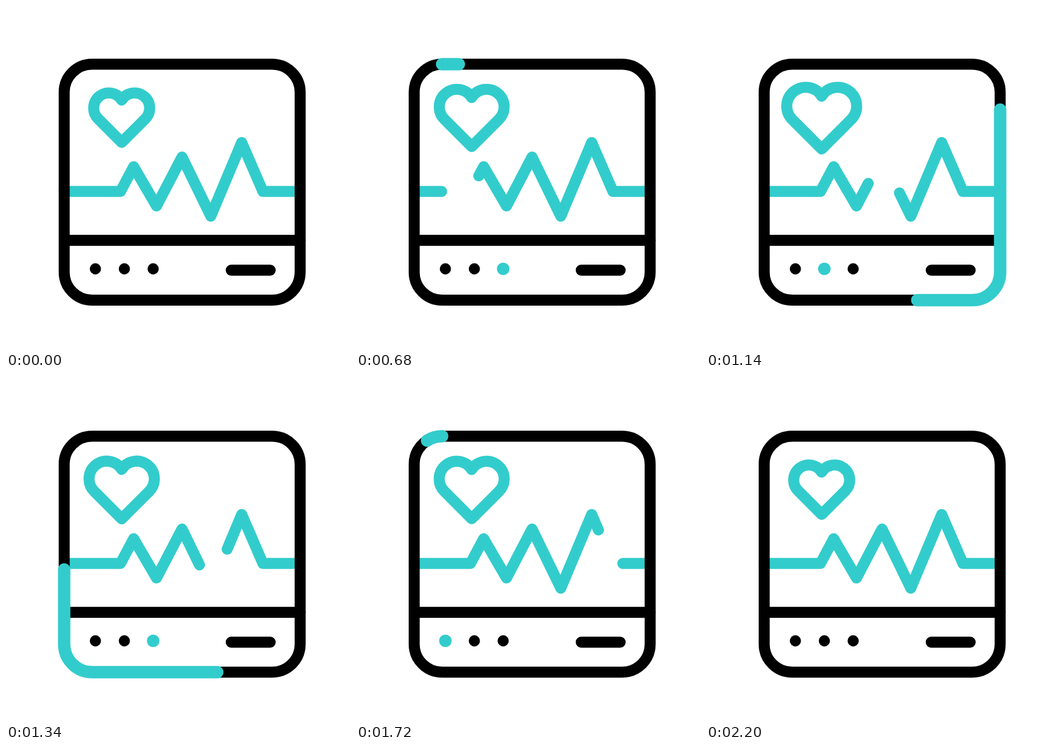
These frames come from a looping animation (640 by 640 pixels, 2400 ms). An HTML page:

```html
<!DOCTYPE html>
<html lang="en">
<head>
<meta charset="utf-8">
<title>Heart monitor</title>
<style>
  @property --tail { syntax: "<length>"; inherits: false; initial-value: 0px; }
  @property --head { syntax: "<length>"; inherits: false; initial-value: 0px; }
  @property --beat { syntax: "<number>"; inherits: false; initial-value: 1; }

  :root {
    --teal: #33cccc;
    --line: 20.5px;
    --loop: 2400ms cubic-bezier(.3333, 0, .6667, 1) infinite;
  }
  html, body { margin: 0; width: 100%; height: 100%; overflow: hidden; background: #fff; }
  svg { display: block; width: 640px; height: 640px; }

  .ink, .teal {
    fill: none;
    stroke-width: var(--line);
    stroke-linecap: round;
    stroke-linejoin: round;
  }
  .ink { stroke: #000; }
  .teal { stroke: var(--teal); }

  /* Path lengths are normalised to 1000 */
  .drawn {
    stroke-dasharray: var(--tail) 2000px;
    animation: wave-tail var(--loop);
  }
  .erased {
    stroke-dasharray: 1000px 2000px;
    stroke-dashoffset: calc(-1 * var(--head));
    animation: wave-head var(--loop);
  }
  .runner {
    stroke-width: 23px;
    stroke-dasharray: calc(var(--head) - var(--tail)) 3000px;
    stroke-dashoffset: calc(-1 * var(--tail));
    opacity: 0;
    animation: run-head var(--loop), run-tail var(--loop), run-show 2400ms step-end infinite;
  }
  .heart {
    stroke-width: calc(var(--line) / var(--beat));
    transform-origin: 215.25px 204.5px;
    transform: scale(var(--beat));
    animation: beat var(--loop);
  }
  .lamp {
    fill: var(--teal);
    opacity: 0;
    animation: blink 2400ms step-end calc(var(--i) * 222.22ms) infinite;
  }

  @keyframes wave-head {
    0%, 8.3333% { --head: 0px; }
    83.3333%, 100% { --head: 1000px; }
  }
  @keyframes wave-tail {
    0%, 16.6667% { --tail: 0px; }
    91.6667%, 100% { --tail: 1000px; }
  }
  @keyframes run-head {
    0%, 25% { --head: 0px; }
    66.6667%, 100% { --head: 1000px; }
  }
  @keyframes run-tail {
    0%, 33.3333% { --tail: 0px; }
    75%, 100% { --tail: 1000px; }
  }
  @keyframes run-show {
    0% { opacity: 0; }
    25.4% { opacity: 1; }
    75%, 100% { opacity: 0; }
  }
  @keyframes beat {
    0%, 8.3333%, 36.1111%, 63.8889%, 91.6667%, 100% { --beat: 1; }
    22.2222%, 50%, 77.7778% { --beat: 1.27; }
  }
  @keyframes blink {
    0%, 17.2%, 44.9%, 72.7%, 100% { opacity: 0; }
    9.1%, 36.5%, 64% { opacity: 1; }
  }
</style>
</head>
<body>
<svg viewBox="0 0 640 640">
  <defs>
    <path id="wave" pathLength="1000"
      d="M108 345H213L237.5 299L280 372L327.5 281L381 391L438.5 254L478 345H547"/>
  </defs>

  <use href="#wave" class="teal drawn"/>
  <use href="#wave" class="teal erased"/>

  <g class="ink">
    <rect x="108.25" y="108.25" width="439" height="439" rx="52"/>
    <path d="M108.25 436H547.25M419 491.5H491.5"/>
  </g>

  <g>
    <circle cx="166.3" cy="489" r="10.4"/>
    <circle cx="220.2" cy="489" r="10.4"/>
    <circle cx="273.8" cy="489" r="10.4"/>
  </g>
  <circle class="lamp" style="--i:0" cx="166.3" cy="489" r="11.6"/>
  <circle class="lamp" style="--i:1" cx="220.2" cy="489" r="11.6"/>
  <circle class="lamp" style="--i:2" cx="273.8" cy="489" r="11.6"/>

  <path class="teal heart"
    d="M215.25 175A28.2 28.2 0 1 0 171.7 210.2L215.25 253.8L258.8 210.2A28.2 28.2 0 1 0 215.25 175Z"/>

  <path class="teal runner" pathLength="1000"
    d="M160.25 108.25h335a52 52 0 0 1 52 52v335a52 52 0 0 1-52 52h-335a52 52 0 0 1-52-52v-335a52 52 0 0 1 52-52"/>
</svg>
</body>
</html>
```
